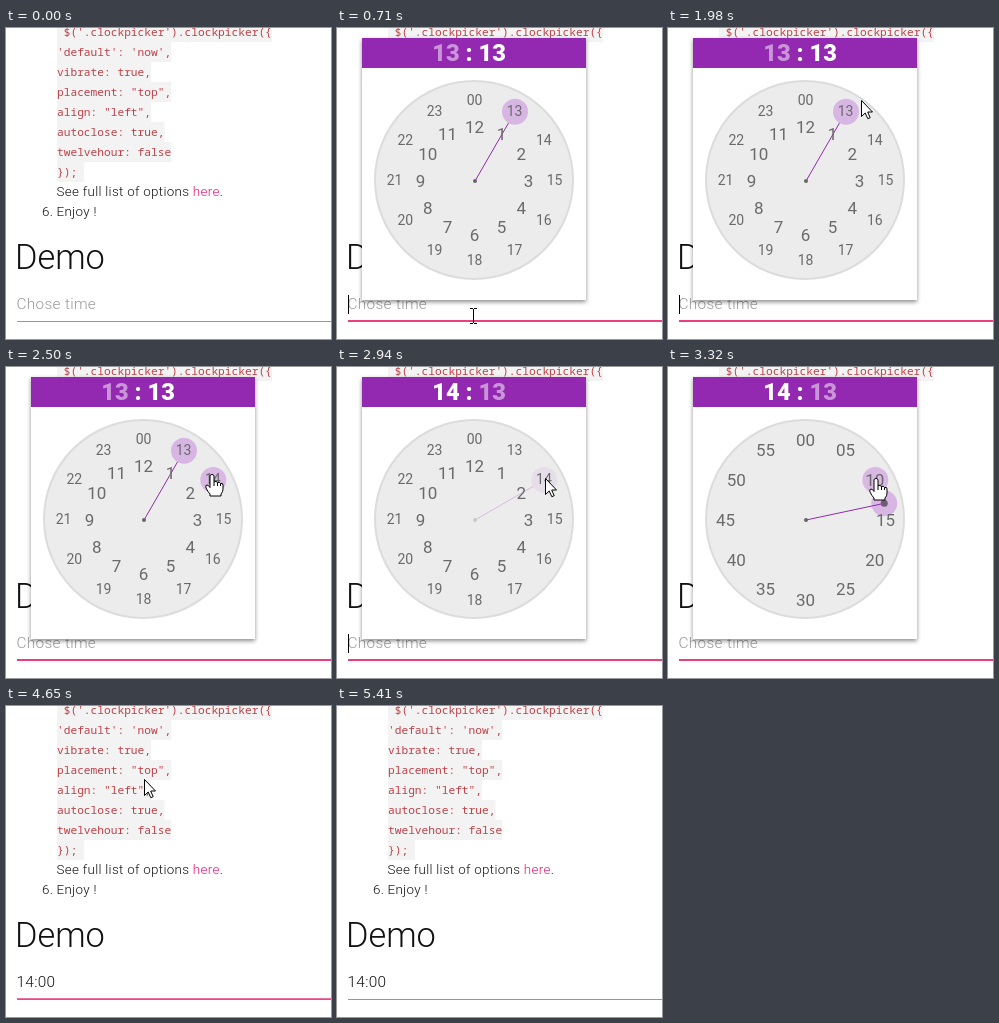
An HTML page that plays this animation: 325 px wide and 311 px high, repeating every 6.02 s.

```html
<!DOCTYPE html>
<html lang="en">
<head>
<meta charset="utf-8">
<title>Clock picker demo</title>
<style>
html, body { margin: 0; width: 100%; height: 100%; overflow: hidden; background: #fff; }
svg { display: block; width: 325px; height: 311px; }
text { font-family: Roboto, sans-serif; white-space: pre; }
.code { font: 11.2px "Noto Sans Mono", monospace; fill: #bd4147; }
.body { font-size: 13.4px; font-weight: 300; letter-spacing: .3px; fill: #111; }
.title { font-size: 34.3px; font-weight: 300; fill: #111; }
.input { font-size: 15.4px; font-weight: 300; letter-spacing: .3px; }
.head { font-size: 23.6px; font-weight: 800; fill: #fff; }
.tick { fill: #6a6a6a; text-anchor: middle; }
.card { filter: drop-shadow(0 2px 2px rgba(0, 0, 0, .45)); }
</style>
</head>
<body>
<svg viewBox="0 0 325 311">
  <g id="page"></g>
  <g id="field"></g>
  <g id="picker"></g>
  <g id="pointer"></g>
</svg>
<script>
const LOOP = 6020, CX = 138, CY = 153, OUTER = 80, INNER = 54, TICK = 13;
const PURPLE = '#9429b1', LILAC = '#d8b6e4';
const PRESS_HOUR = 2860, TO_MINUTES = 2940, NEW_HAND = 3090, PRESS_MINUTE = 4350, RELEASE = 4430, CLOSE = 4580;

// Screen updates: [first, last, count]
const RUNS = [
  [260, 560, 5], [710, 710, 1], [1100, 1680, 9], [1760, 2340, 9], [2420, 2580, 3], [2720, 2720, 1],
  [2860, 3320, 7], [3460, 3900, 7], [4210, 4210, 1], [4350, 4650, 5], [5030, 5410, 6]
];
// Pointer path: [time, x, y]
const PATH = [
  [260, 137, 305], [560, 136, 287.5], [1030, 136, 287.5], [1680, 144, 70], [1700, 144, 70],
  [1980, 193, 72], [2340, 202, 100], [2580, 208, 111], [3390, 208, 111], [3900, 138, 73],
  [4950, 138, 73], [5410, 165, 330]
];
const CODE = [" $('.clockpicker').clockpicker({", "'default': 'now',", 'vibrate: true,', 'placement: "top",',
  'align: "left",', 'autoclose: true,', 'twelvehour: false', '}); '];

const $ = id => document.getElementById(id);
const clamp = v => Math.max(0, Math.min(1, v));
const ramp = (t, from, length) => clamp((t - from) / length);
const smooth = p => p * p * (3 - 2 * p);
const pad = n => String(n).padStart(2, '0');
const mix = (a, b, p) => `rgb(${a.map((v, i) => Math.round(v + (b[i] - v) * p))})`;
const label = (x, y, cls, str, extra = '') => `<text x="${x}" y="${y}" class="${cls}" ${extra}>${str}</text>`;
const disc = (x, y, r, fill) => `<circle cx="${x}" cy="${y}" r="${r}" fill="${fill}"/>`;
const polar = (deg, r) => {
  const a = deg * Math.PI / 180;
  return [CX + Math.sin(a) * r, CY - Math.cos(a) * r];
};

const ring = (r, size, name) => Array.from({ length: 12 }, (_, i) => {
  const [x, y] = polar(i * 30, r);
  return { x, y, size, str: name(i) };
});
const HOURS = [
  ...ring(OUTER, 14, i => i ? i + 12 : '00'),
  ...ring(INNER, 17, i => i || 12)
];
const MINUTES = ring(OUTER, 17, i => pad(i * 5));

function snap(t) {
  let last = 0;
  for (const [a, b, n] of RUNS)
    for (let i = 0; i < n; i++) {
      const step = Math.round((a + (b - a) * i / (n - 1 || 1)) / 10) * 10;
      if (step <= t) last = step;
    }
  return last;
}

function pointerAt(t) {
  const i = PATH.findIndex(p => p[0] > t);
  if (i < 1) return null;
  const [a, b] = [PATH[i - 1], PATH[i]], p = (t - a[0]) / (b[0] - a[0]);
  return { x: a[1] + (b[1] - a[1]) * p, y: a[2] + (b[2] - a[2]) * p };
}

function drawPage() {
  const code = CODE.map((str, i) =>
    `<rect x="51" y="${i * 20 - 6}" width="${str.length * 6.72}" height="20" fill="#f3f3f3"/>` +
    label(51, i * 20 + 8, 'code', str)).join('');
  return code +
    label(50.5, 168, 'body', 'See full list of options <tspan fill="#ec1470">here</tspan>.') +
    label(36, 188, 'body', '6.') + label(50.5, 188, 'body', 'Enjoy !') +
    label(9, 241, 'title', 'Demo');
}

function drawField(t) {
  const focus = t < CLOSE ? ramp(t, 500, 200) : 1 - ramp(t, 4575, 300);
  const caret = t >= 710 && t < CLOSE && Math.floor(Math.max(0, t - 730) / 496.5) % 2 === 0;
  return (t < CLOSE
    ? label(10.5, 281, 'input', 'Chose time', 'fill="#999"')
    : label(10.5, 281, 'input', '14:00', 'fill="#111"')) +
    `<rect x="11" y="292" width="314" height="1" fill="rgb(234,62,126)" opacity="${focus}"/>` +
    `<rect x="11" y="293" width="314" height="1" fill="${mix([150, 150, 150], [234, 62, 126], focus)}"/>` +
    (caret ? '<rect x="11" y="267" width="1" height="19" fill="#000"/>' : '');
}

function drawDial(ticks, opacity, scale, hover) {
  if (opacity <= 0) return '';
  const marks = ticks.map(k =>
    (k === hover ? `<circle cx="${k.x}" cy="${k.y}" r="${TICK}" fill="#9500c9" opacity=".22"/>` : '') +
    label(k.x - .4, k.y - .5 + k.size * .355, 'tick', k.str, `font-size="${k.size}"`)).join('');
  return `<g opacity="${opacity}" transform="translate(${CX} ${CY}) scale(${scale}) translate(${-CX} ${-CY})">${marks}</g>`;
}

function drawHand(t) {
  const deg = t < PRESS_HOUR ? 30 : t < NEW_HAND ? 60 : t < PRESS_MINUTE ? 78 : 0;
  const dragging = (t >= PRESS_HOUR && t < TO_MINUTES) || (t >= PRESS_MINUTE && t < RELEASE);
  const [x, y] = polar(deg, OUTER);
  const line = `<path d="M${CX} ${CY}L${x} ${y}" stroke="${PURPLE}"/>`;
  const tip = disc(x, y, TICK, LILAC);
  const fade = 1 - .75 * (ramp(t, 2870, 70) - ramp(t, NEW_HAND, 175));
  return `<g opacity="${fade}">` +
    (dragging || deg % 30 ? tip + line + disc(x, y, 3.5, '#6e5c74') : line + tip) +
    disc(CX, CY, 2, '#666') + '</g>';
}

function drawPicker(t, hover) {
  if (t < 710 || t >= CLOSE) return '';
  const swap = smooth(ramp(t, 2930, 350));
  const shown = swap * (1 - smooth(ramp(t, 4420, 350)));
  const dim = on => on ? 'fill-opacity=".5"' : '';
  const hour = t < PRESS_HOUR ? 13 : 14, minute = t < PRESS_MINUTE ? 13 : 0;
  return '<g class="card"><rect x="25" y="10" width="224" height="262" fill="#fff"/></g>' +
    `<rect x="25" y="10" width="224" height="30" fill="${PURPLE}"/>` +
    label(95.3, 33.3, 'head', `<tspan ${dim(t < TO_MINUTES)}>${hour}</tspan> : ` +
      `<tspan ${dim(t >= TO_MINUTES)}>${pad(minute)}</tspan>`) +
    '<circle cx="137" cy="152" r="99" fill="#ececec" stroke="#dcdcdc" stroke-width="2"/>' +
    drawHand(t) +
    drawDial(HOURS, 1 - swap, 1 + .2 * swap, hover) +
    drawDial(MINUTES, shown, .8 + .2 * shown, hover);
}

function findHover(t, p) {
  if (!p || t < 710 || t >= PRESS_MINUTE || (t >= PRESS_HOUR && t < NEW_HAND)) return null;
  const ticks = t < TO_MINUTES ? HOURS : MINUTES;
  return ticks.find(k => Math.hypot(k.x - p.x, k.y - p.y) < TICK);
}

function drawPointer(t, p, hover) {
  if (!p) return '';
  const at = `transform="translate(${Math.round(p.x)} ${Math.round(p.y)})"`;
  const solid = 'fill="#fff" stroke="#000" stroke-linejoin="round"';
  if (hover)
    return `<g ${at} ${solid}><path d="M-2 1.5Q0-1 2 1.5V8Q4 6.5 5.5 8.5Q7.5 7.5 8.5 9.5Q11 8.5 11 11V15Q11 18 9 20V22H-2V20Q-4 18-6 14Q-7 11-5 11Q-3.5 11-2 13.5Z"/><path d="M2 8V12M5.5 8.5V12M8.5 9.5V12"/></g>`;
  if (p.y > 272 && p.y < 294)
    return `<path ${at} d="M-3-7.5H0M1-7.5H4M.5-7V7M-3 7.5H0M1 7.5H4" fill="none" stroke="#000"/>`;
  return `<path ${at} ${solid} d="M.5.5V16.5L4.2 13L6.8 18.7L9.2 17.7L6.7 12H11.5Z"/>`;
}

function draw(t) {
  const p = pointerAt(t), hover = findHover(t, p);
  $('field').innerHTML = drawField(t);
  $('picker').innerHTML = drawPicker(t, hover);
  $('pointer').innerHTML = drawPointer(t, p, hover);
}

$('page').innerHTML = drawPage();
const start = performance.now();
let shownAt = -1;
function tick() {
  const t = snap((performance.now() - start) % LOOP);
  if (t !== shownAt) draw(shownAt = t);
  requestAnimationFrame(tick);
}
tick();
</script>
</body>
</html>
```
